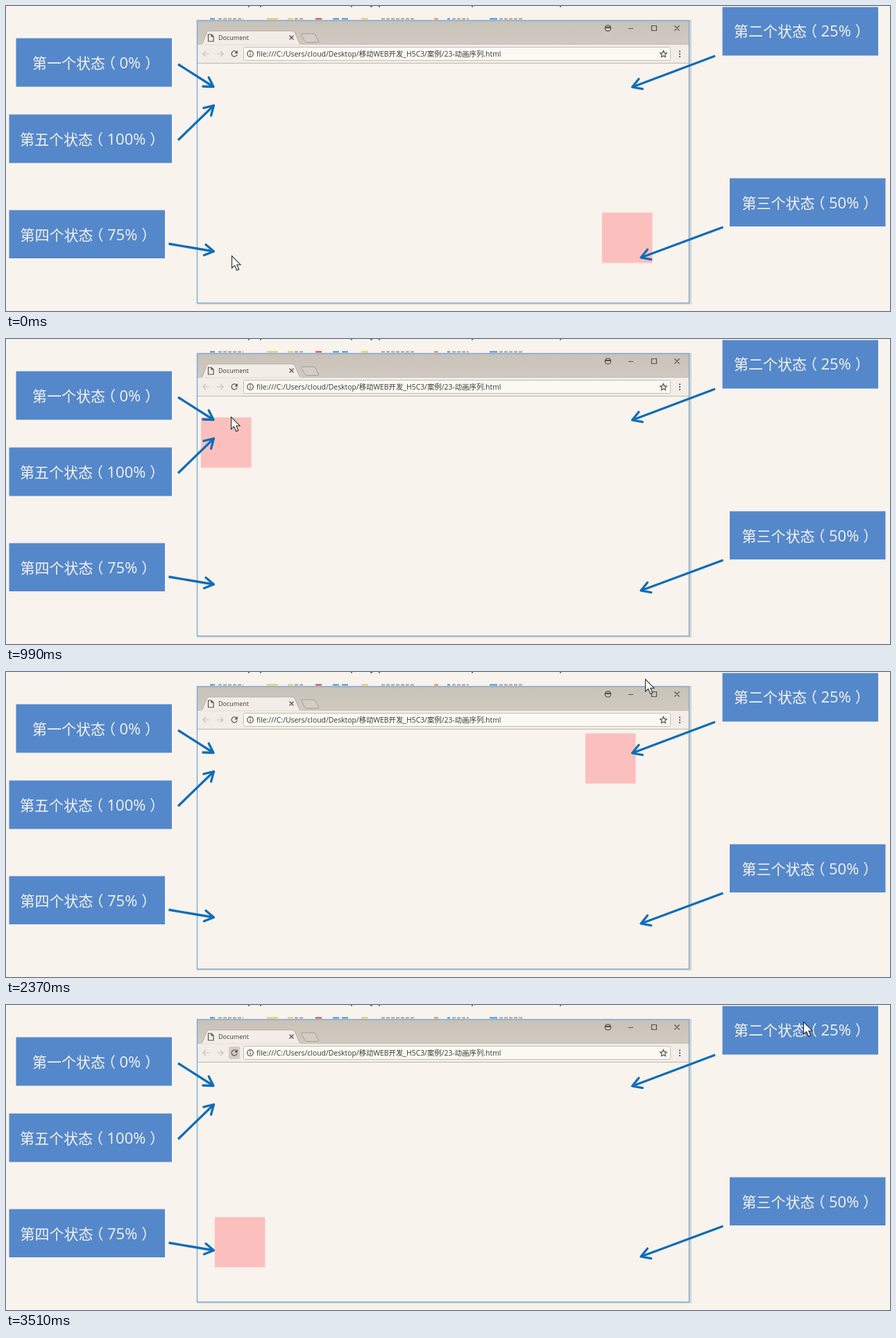
These frames come from a looping animation (1274 by 440 pixels, 3540 ms). An HTML page:

```html
<!DOCTYPE html>
<html lang="zh">
<head>
<meta charset="utf-8">
<title>Animation steps</title>
<style>
  html, body { margin: 0; width: 100%; height: 100%; overflow: hidden; background: #f8f3ec; }
  svg { display: block; }
  text { font-family: "Open Sans", "Noto Sans CJK SC", "Noto Sans CJK", sans-serif; white-space: pre; }
  .label rect { fill: #5488cb; }
  .label text { fill: #f8f3ec; font-size: 21px; font-family: "Noto Sans CJK SC", "Noto Sans CJK", sans-serif; }
  .label .num { font: 22px "Open Sans", sans-serif; }
  .arrows { stroke: #0f6db7; stroke-width: 3.3; fill: none; }
  .arrows path { marker-end: url(#head); }
  .icon { stroke: #55504a; stroke-width: 1.2; fill: none; }
  .dim { stroke: #c9c3bb; }

  .box, .cursor, .hover, .tip { animation: 3540ms linear infinite; }
  .box { fill: #fbc0be; animation-name: box; }
  .cursor { animation-name: cursor; }
  .hover { animation-name: hover; }
  .tip { animation-name: tip; }
  .hover, .tip { animation-timing-function: step-end; }

  @keyframes box {
    0% { transform: translate(859px, 298px); animation-timing-function: cubic-bezier(.293, .639, .624, 1); }
    3.644% { transform: translate(859px, 306px); animation-timing-function: ease; }
    18.842% { transform: translate(281px, 306px); animation-timing-function: ease; }
    34.04% { transform: translate(281px, 88.5px); }
    55.565% { transform: translate(281px, 88.5px); animation-timing-function: ease; }
    70.904% { transform: translate(859px, 88.5px); animation-timing-function: ease; }
    85.367% { transform: translate(859px, 306px); }
    87.486% { transform: translate(859px, 306px); animation-timing-function: cubic-bezier(.278, .093, .303, .865); }
    100% { transform: translate(292.4px, 306px); }
  }
  @keyframes cursor {
    0%, 0.8% { transform: translate(325px, 360px); animation-timing-function: ease-in-out; }
    8.5%, 31.4% { transform: translate(324px, 112px); animation-timing-function: ease-in-out; }
    36.4%, 45.8% { transform: translate(328px, 66px); animation-timing-function: ease-in-out; }
    50%, 52.5% { transform: translate(324px, 112px); animation-timing-function: ease-in-out; }
    65%, 67.8% { transform: translate(921px, 10px); animation-timing-function: ease-in-out; }
    78%, 79.7% { transform: translate(963px, 100px); animation-timing-function: ease-in-out; }
    91.5%, 93.2% { transform: translate(1229px, 38px); animation-timing-function: ease-in-out; }
    98.9%, 100% { transform: translate(1149px, 24px); }
  }
  @keyframes hover {
    0% { opacity: 0; }
    36.4% { opacity: 1; }
    59.3% { opacity: 0; }
    72%, 100% { opacity: 1; }
  }
  @keyframes tip {
    0% { opacity: 0; }
    42.4% { opacity: 1; }
    59.3%, 100% { opacity: 0; }
  }
</style>
</head>
<body>
<svg width="1274" height="440" viewBox="0 0 1274 440">
  <defs>
    <marker id="head" markerUnits="userSpaceOnUse" markerWidth="30" markerHeight="30" orient="auto" overflow="visible">
      <path d="M-13 -7.7L0 0L-13 7.7" fill="none" stroke="#0f6db7" stroke-width="3.3" stroke-linejoin="round" stroke-linecap="round"/>
    </marker>
    <linearGradient id="bar" x2="0" y2="1">
      <stop offset="0" stop-color="#c8c2b9"/>
      <stop offset="1" stop-color="#d0cac1"/>
    </linearGradient>
  </defs>
  <rect width="1274" height="440" fill="#f8f3ec"/>

  <!-- cropped rows above the window -->
  <path stroke="#5d5a56" stroke-width="1.5" d="M349 .7h2M366 .7h2M497 .7h2M525 .7h3M537 .7h2M671 .7h2M798 .7h2"/>
  <g stroke-width="2" fill="none">
    <path stroke="#4d91cf" d="M294 18.5h7M471 18.5h9M484 18.5h9M636 18.5h4M697 18.5h11"/>
    <path stroke="#e6c75d" d="M376 18.5h16M406 18.5h8M512 18.5h10"/>
    <path stroke="#d33f38" d="M446 18.5h9"/>
    <path stroke="#df8a46" d="M617 18.5h6"/>
    <path stroke="#a5a29d" stroke-dasharray="5 2" d="M306 18.5h36M416 18.5h12M541 18.5h48M643 18.5h24M711 18.5h33"/>
  </g>

  <!-- browser window -->
  <rect x="275" y="20" width="713" height="410.500" fill="#d9d5ce"/>
  <rect x="275" y="21" width="710" height="407.500" fill="#f8f3ec"/>
  <rect x="275" y="21" width="710" height="35" fill="url(#bar)"/>
  <rect x="275" y="55" width="710" height="27.500" fill="#f2ede6"/>
  <path d="M275 55.300H985" stroke="#b8b2aa" stroke-width=".8"/>
  <path d="M275 82.500H985" stroke="#bdb7af"/>
  <path d="M280 56Q283 55 284 52L289 39Q290 36 293 36H412Q415 36 416.500 39L422 52Q423 55 426 56Z" fill="#f2ede6" stroke="#aaa49c" stroke-width=".8"/>
  <path d="M280 56H426" stroke="#f2ede6" stroke-width="1.6"/>
  <path d="M425.500 41Q425 40 427 40H443Q445 40 446 42L450.500 51Q451 52.500 449 52.500H434Q431.500 52.500 430.500 50.500Z" fill="#d3cdc4" stroke="#a39d95"/>
  <path class="icon" stroke-width="1" d="M291.500 41H296L299 44V51H291.500ZM296 41V44H299"/>
  <text x="306" y="49" font-size="9" fill="#3d3a36">Document</text>
  <path class="icon" d="M408.500 42.500l6 6m0-6l-6 6"/>

  <g class="icon">
    <circle cx="867.500" cy="32" r="4.200"/>
    <path d="M864 31h7" stroke-width="2"/>
    <path d="M897 32.500h7M930.500 28.500h7v7h-7zM963.500 28.500l7 7m0-7l-7 7"/>
  </g>

  <path class="icon dim" d="M293 69h-9m4-4l-4 4l4 4M304 69h9m-4-4l4 4l-4 4"/>
  <rect class="hover" x="321" y="60" width="16" height="18" rx="2" fill="#d3cdc5"/>
  <path class="icon" stroke-width="1.400" d="M332.300 66.500A4 4 0 1 0 333 69.800"/>
  <path d="M333.800 64v4.500h-4.500z" fill="#55504a"/>

  <rect x="342.500" y="59.500" width="615" height="19" rx="2" fill="#fcf9f4" stroke="#c3bdb5"/>
  <circle class="icon" stroke-width="1" cx="352" cy="69" r="4.300"/>
  <path class="icon" d="M352 68.500v3M352 66v1.200"/>
  <text x="361" y="72.700" font-size="10.400" fill="#3d3a36">file:///C:/Users/cloud/Desktop/移动WEB开发_H5C3/案例/23-动画序列.html</text>
  <path class="icon" stroke-width="1.100" d="M947.500 64.500l1.400 3.100 3.400.4-2.500 2.300.7 3.400-3-1.700-3 1.700.7-3.400-2.500-2.300 3.400-.4z"/>
  <path d="M971 64.500v2m0 1.700v2m0 1.700v2" stroke="#55504a" stroke-width="1.800"/>

  <rect class="box" width="72.500" height="72.500"/>

  <rect x="275.500" y="21" width="709" height="407.500" fill="none" stroke="#7babd6" stroke-width="1.400"/>

  <g class="tip">
    <rect x="332" y="84" width="62" height="17" fill="#8a8680" opacity=".55"/>
    <rect x="330.500" y="82.500" width="61" height="16" fill="#f9f5ef" stroke="#85817b"/>
    <text x="334" y="94" font-size="8.700" fill="#55524e">重新加载此页</text>
  </g>

  <g class="label">
    <rect x="14.500" y="46.500" width="224.500" height="70"/>
    <text x="38" y="89.500">第一个状态<tspan dx="-6">（</tspan><tspan class="num" dx="5.500">0%</tspan><tspan dx="6">）</tspan></text>
    <rect x="4.500" y="156.500" width="234.500" height="70"/>
    <text x="20" y="200">第五个状态<tspan dx="-6">（</tspan><tspan class="num" dx="5.500">100%</tspan><tspan dx="6">）</tspan></text>
    <rect x="4.500" y="294.500" width="224.500" height="69.500"/>
    <text x="20.500" y="338">第四个状态<tspan dx="-6">（</tspan><tspan class="num" dx="5.500">75%</tspan><tspan dx="6">）</tspan></text>
    <rect x="1032.500" y="1.500" width="224.500" height="70"/>
    <text x="1049" y="44">第二个状态<tspan dx="-6">（</tspan><tspan class="num" dx="5.500">25%</tspan><tspan dx="6">）</tspan></text>
    <rect x="1043" y="248.500" width="224.500" height="69.500"/>
    <text x="1060.500" y="292">第三个状态<tspan dx="-6">（</tspan><tspan class="num" dx="5.500">50%</tspan><tspan dx="6">）</tspan></text>
  </g>

  <g class="arrows">
    <path d="M248 84L299 116.500"/>
    <path d="M248 193.500L299.500 143.500"/>
    <path d="M234.500 343L299.500 354"/>
    <path d="M1022 72L902.500 117"/>
    <path d="M1033.500 319L915 363"/>
  </g>

  <path class="cursor" d="M.5 .5V18L4.600 14.300L7.700 21.300L10.800 20L7.800 13.200H13Z" fill="#fffdfa" stroke="#2b2b2b" stroke-width="1.100"/>
</svg>
</body>
</html>
```
